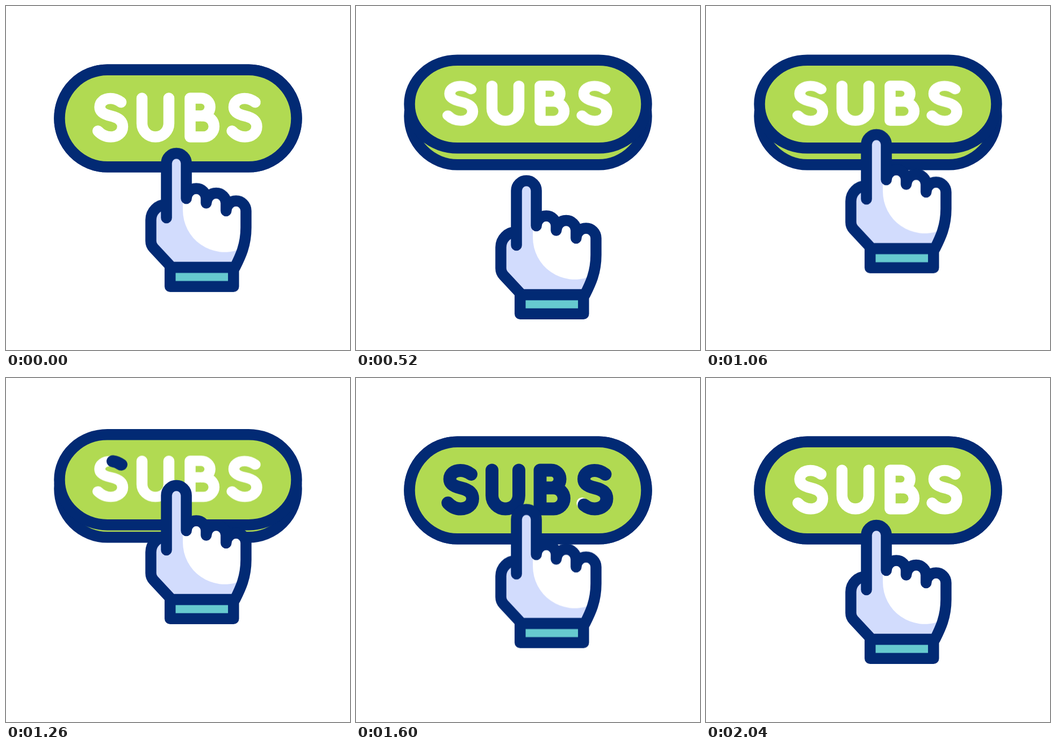
Write an HTML page that moves like this. It is 640 px wide and 640 px high and loops after 2.4 s.

```html
<!DOCTYPE html>
<html lang="en">
<head>
<meta charset="utf-8">
<title>Subs button</title>
<style>
  html, body { margin: 0; width: 100%; height: 100%; overflow: hidden; background: #fff; }
  svg { display: block; width: 100vw; height: 100vh; }

  .line { stroke: #022a74; stroke-width: 20.5px; stroke-linecap: round; stroke-linejoin: round; }
  .green { fill: #b1da52; }
  .none { fill: none; }
  .letters { fill: none; stroke-linecap: round; stroke-linejoin: round; }
  .white { stroke: #fff; stroke-width: 20.5px; }
  .ink { stroke: #022a74; stroke-width: 24px; stroke-dasharray: 1 3; }

  .base, .top, .label, .hand, .ink use {
    animation: 2400ms cubic-bezier(.333, 0, .667, 1) infinite;
  }
  .base { animation-name: base; }
  .top { animation-name: top; }
  .label { animation-name: label; transform-origin: 0 207.75px; }
  .hand { animation-name: hand; }
  .ink use { animation-timing-function: linear; }
  .ink use:nth-child(1) { animation-name: ink1; }
  .ink use:nth-child(2) { animation-name: ink2; }
  .ink use:nth-child(3) { animation-name: ink3; }
  .ink use:nth-child(4) { animation-name: ink4; }

  /* button: pressed, released, pressed */
  @keyframes base {
    0%, 63.9%, 100% { transform: translateY(0); }
    20.83%, 46.96% { transform: translateY(-4px); }
  }
  @keyframes top {
    0%, 63.9%, 100% { y: 118.75px; height: 180.5px; ry: 90.25px; }
    20.83%, 46.96% { y: 100.75px; height: 163.5px; ry: 81.75px; }
  }
  @keyframes label {
    0%, 63.9%, 100% { transform: translateY(0) scale(1, 1); }
    20.83%, 46.96% { transform: translateY(-26.7px) scale(1, .908); }
  }
  @keyframes hand {
    0% { transform: translateY(0); animation-timing-function: cubic-bezier(.167, .167, .667, 1); }
    21.67%, 31.67% { transform: translateY(51px); }
    51.67%, 52.5% { transform: translateY(-74px); }
    77.5%, 100% { transform: translateY(0); }
  }

  /* each letter is inked along its path, then wiped the same way */
  @keyframes ink1 {
    0%, 51.96% { stroke-dashoffset: 1.1; }
    55.2%, 70.1% { stroke-dashoffset: 0; }
    73.4% { stroke-dashoffset: -1; }
    73.5%, 100% { stroke-dashoffset: -1.1; }
  }
  @keyframes ink2 {
    0%, 55.2% { stroke-dashoffset: 1.1; }
    58.6%, 73.4% { stroke-dashoffset: 0; }
    76.75% { stroke-dashoffset: -1; }
    76.85%, 100% { stroke-dashoffset: -1.1; }
  }
  @keyframes ink3 {
    0%, 58.5% { stroke-dashoffset: 1.1; }
    58.6% { stroke-dashoffset: 1; }
    63.6%, 76.75% { stroke-dashoffset: 0; }
    81.75% { stroke-dashoffset: -1; }
    81.85%, 100% { stroke-dashoffset: -1.1; }
  }
  @keyframes ink4 {
    0%, 63.6% { stroke-dashoffset: 1.1; }
    66.8%, 81.75% { stroke-dashoffset: 0; }
    84.9%, 100% { stroke-dashoffset: -1.1; }
  }
</style>
</head>
<body>
<svg viewBox="0 0 640 640" role="img" aria-label="SUBS">
  <defs>
    <path id="s" pathLength="1" d="M214 179C208 174.5 202 172 194 172C183 172 174.5 178.500 174.500 188C174.500 198 184 202 195 204.500C208 207.500 217 213 217 224.500C217 236 207 243.500 195 243.500C185 243.500 177 239 171 232.500"/>
    <path id="u" pathLength="1" d="M253 171.500V218.500A25 25 0 0 0 303 218.500V171.500"/>
    <path id="b" pathLength="1" d="M360 204.500H342.500V243.500H367.500A19.500 19.500 0 0 0 367.500 204.500H363A16.500 16.500 0 0 0 363 171.500H342.500V204.500"/>
    <path id="body" d="M298.500 394V292.500a18.500 18.500 0 0 1 37 0V358a18.500 18.500 0 0 1 37 0V366.500a18.500 18.500 0 0 1 37 0V381a18.500 18.500 0 0 1 37 0V412C446.500 445 436 466 426 486H308L274.500 450Q269.500 444.500 269.500 437V398C269.500 382 282 369.500 298.500 369"/>
    <clipPath id="inside"><use href="#body"/></clipPath>
  </defs>

  <rect class="base line green" x="99.5" y="118.75" width="441" height="180.5" rx="89" ry="90.25"/>
  <rect class="top line green" x="99.5" y="118.75" width="441" height="180.5" rx="89" ry="90.25"/>

  <g class="label letters">
    <g class="white">
      <use href="#s"/><use href="#u"/><use href="#b"/><use href="#s" x="249.5"/>
    </g>
    <g class="ink">
      <use href="#s"/><use href="#u"/><use href="#b"/><use href="#s" x="249.5"/>
    </g>
  </g>

  <g class="hand">
    <use href="#body" fill="#d2dcfd"/>
    <path clip-path="url(#inside)" fill="#fff" d="M329 330V380A78 78 0 0 0 434 453L470 420V330Z"/>
    <use href="#body" class="line none"/>
    <rect class="line" fill="#66cacf" x="305.3" y="486.3" width="118" height="35.5"/>
  </g>
</svg>
</body>
</html>
```
